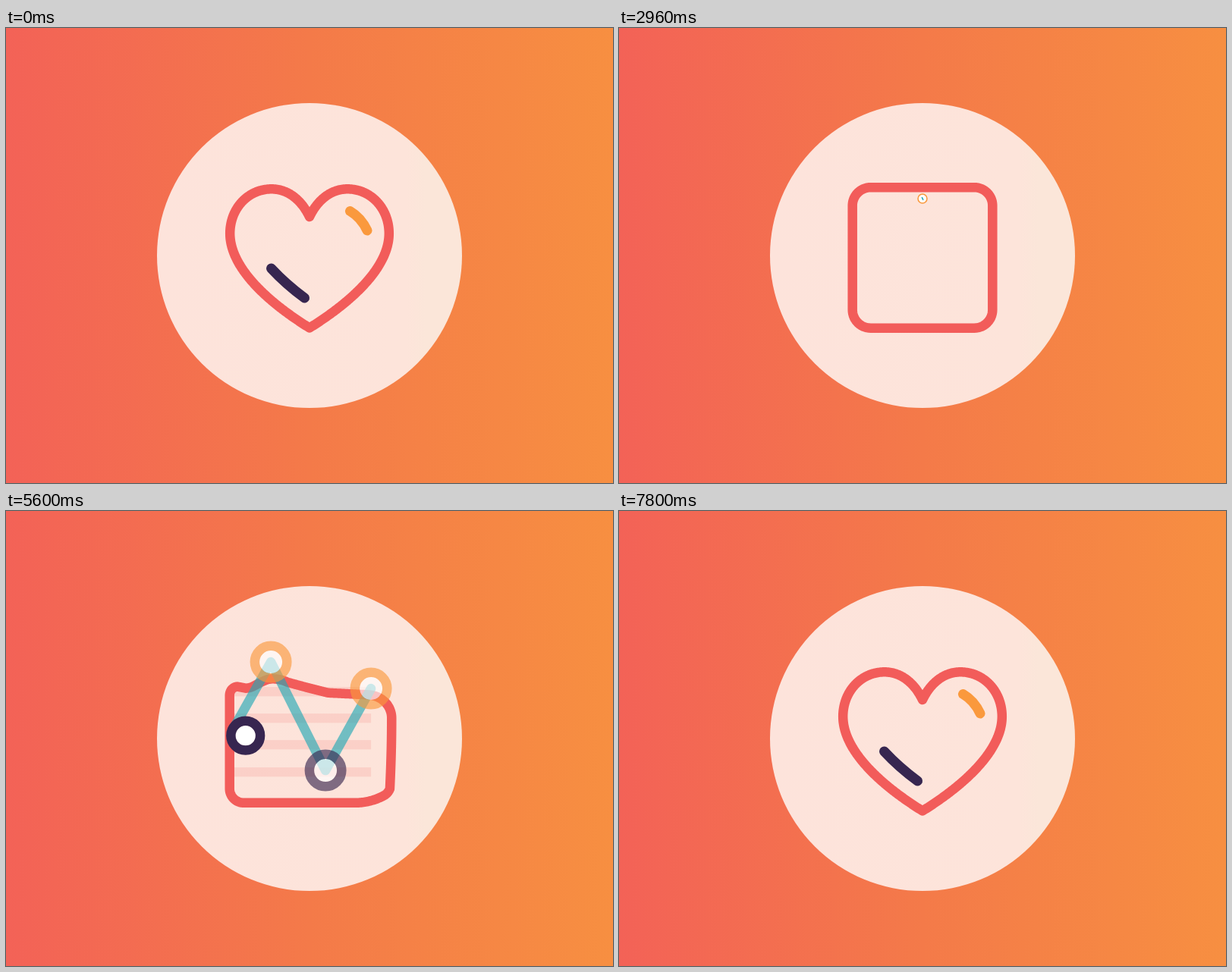
An HTML page with a canvas for the animation above (7.84 s loop, 800 by 600 pixels).

```html
<!DOCTYPE html>
<html lang="en">
<head>
<meta charset="utf-8">
<title>Health icons</title>
<style>
  html, body { margin: 0; width: 100%; height: 100%; overflow: hidden; }
  canvas { display: block; width: 800px; height: 600px; }
</style>
</head>
<body>
<canvas id="stage" width="800" height="600"></canvas>
<script>
const ctx = document.getElementById('stage').getContext('2d');
const LOOP = 7840, STEP = 40, MORPH = 440, LINE = 12.5;
const RED = '#f25c5a', ORANGE = '#fa993d', TEAL = '#22a9b5', DARK = '#372650';

const ramp = (t, from, to) => Math.min(1, Math.max(0, (t - from) / (to - from)));
const lerp = (a, b, p) => a + (b - a) * p;

function svgPath(d) {
  const el = document.createElementNS('http://www.w3.org/2000/svg', 'path');
  el.setAttribute('d', d);
  return el;
}

// Samples each piece evenly; every piece starts where the last one ended.
function sample(start, count, pieces) {
  const points = [];
  let [x, y] = start;
  for (const piece of pieces) {
    const el = svgPath(`M${x} ${y}${piece}`), length = el.getTotalLength();
    for (let i = 0; i <= count; i++) {
      ({ x, y } = el.getPointAtLength(length * i / count));
      points.push([x, y]);
    }
  }
  return points;
}

// Clockwise ring from the bottom, built from the left half (top to bottom).
const mirrored = half => [...[...half].reverse(), ...half.map(([x, y]) => [800 - x, y])];

const HEART = ['C389 226 371 212.3 350 212.3C319 212.3 295.2 238 295.2 271C295.2 311 335 355 400 395.5'];
const DROP = ['Q394 188 391 196', 'C373 228 355 255 342 282', 'C334 298 329 311 329 326', 'A71 71 0 0 0 400 397'];
const BOX = ['H331.7', 'A24 24 0 0 0 307.7 234.2', 'V326', 'V371.7A24 24 0 0 0 331.7 395.7H400'];
const BOX_RING = [
  'H331.7', 'A24 24 0 0 1 307.7 371.7', 'V234.2',
  'A24 24 0 0 1 310.9 222.2', 'A24 24 0 0 1 314.7 217.2', 'A24 24 0 0 1 321.9 212.3',
  'A24 24 0 0 1 331.7 210.2', 'H350', 'H400', 'H468.7',
  'A24 24 0 0 1 492.7 234.2', 'V371.7', 'A24 24 0 0 1 468.7 395.7'
];
const SHOE = [
  'H281', 'A9 9 0 0 1 272 356.7', 'V260',
  'C272 247 284 242 294 248', 'L318 262.5', 'Q328 268 338 261.5',
  'L366 243.5', 'C380 237 397 243 408 253', 'Q436 273 467 291.5', 'L497 299',
  'C522 304 535.5 322 535.5 341', 'Q535.5 350 529 357', 'C524 363 518 365.7 511 365.7H445'
];

const heart = mirrored(sample([400, 249], 239, HEART));
const dropEven = mirrored(sample([400, 188], 239, [DROP.join('')]));
const drop = mirrored(sample([400, 188], 60, DROP));
const box = mirrored(sample([400, 210.2], 60, BOX));
const boxRing = sample([468.7, 395.7], 36, BOX_RING);
const shoe = sample([445, 365.7], 36, SHOE);
const shoeEven = sample([445, 365.7], 479, [SHOE.join('')]);

const morphs = [
  { at: 1000, from: heart, to: dropEven },
  { at: 2440, from: drop, to: box },
  { at: 5440, from: boxRing, to: shoe },
  { at: 7280, from: shoeEven, to: heart }
];

function drawOutline(t) {
  const { at, from, to } = morphs.filter(m => m.at <= t).pop() || morphs[0];
  const p = ramp(t, at, at + MORPH);
  ctx.beginPath();
  from.forEach(([x, y], i) => ctx.lineTo(lerp(x, to[i][0], p), lerp(y, to[i][1], p)));
  ctx.closePath();
  ctx.strokeStyle = RED;
  ctx.lineWidth = LINE;
  ctx.stroke();
}

function mark(d, color, width) {
  return { path: new Path2D(d), length: svgPath(d).getTotalLength(), color, width };
}

function drawMark({ path, length, color, width }, part = 1, alpha = 1, cap = 'round') {
  if (part <= 0 || alpha <= 0) return;
  ctx.save();
  ctx.globalAlpha = alpha;
  ctx.lineCap = cap;
  ctx.strokeStyle = color;
  ctx.lineWidth = width;
  if (part < 1) ctx.setLineDash([length * part, length * 2]);
  ctx.stroke(path);
  ctx.restore();
}

function ring(x, y, r, color, alpha = 1, scale = 1) {
  if (scale <= 0 || alpha <= 0) return;
  ctx.save();
  ctx.globalAlpha = alpha;
  ctx.translate(x, y);
  ctx.scale(scale, scale);
  ctx.fillStyle = '#fff';
  ctx.beginPath();
  ctx.arc(0, 0, r - LINE, 0, 7);
  ctx.fill();
  ctx.strokeStyle = color;
  ctx.lineWidth = LINE;
  ctx.beginPath();
  ctx.arc(0, 0, r - LINE / 2, 0, 7);
  ctx.stroke();
  ctx.restore();
}

const shine = mark('M453.5 241.5Q468 250 476 267', ORANGE, 13);
const shade = mark('M349.5 317Q369 338 393.5 356', DARK, 13);
const dropArc = mark('M361.5 326A38.5 38.5 0 0 0 400 364.5', TEAL, 10);
const needle = mark('M395 214L406 236', TEAL, LINE);
const chartLine = mark('M315 293.5L362 210L434 353L494 245', TEAL, LINE);
const stripe = mark('M274 332.3H532', ORANGE, 13);
const laces = [mark('M414 261L395 279.5', TEAL, LINE), mark('M446 283L422 306', TEAL, LINE)];

function heartMarks(t) {
  const leaving = t < 4000;
  const part = leaving ? 1 : ramp(t, 7480, 7800);
  const alpha = leaving ? 1 - ramp(t, 1000, 1000 + MORPH) : 1;
  drawMark(shine, part, alpha);
  drawMark(shade, part, alpha);
}

function bars(t, fade) {
  const first = ramp(t, 3240, 3320), extra = ramp(t, 3960, 3960 + MORPH);
  [[249, extra], [284, extra], [319, first], [355, first]].forEach(([y, shown]) => {
    ctx.globalAlpha = 0.23 * shown * fade;
    ctx.fillStyle = RED;
    ctx.fillRect(308, y - 6, 186, 12.3);
  });
  ctx.globalAlpha = 1;
}

function dialAndChart(t, fade) {
  const move = ramp(t, 3960, 3960 + MORPH);
  const pop = ramp(t, 4440, 4760);
  drawMark(chartLine, ramp(t, 4405, 4985), fade);
  ring(434, 353, 27.5, DARK, fade, pop);
  ring(494, 245, 27.5, ORANGE, fade, pop);
  const grow = ramp(t, 2920, 3240);
  ring(lerp(400, 362, move), lerp(225, 210, move), lerp(54, 27.5, move), ORANGE, fade, grow);
  ctx.save();
  ctx.translate(400, 225);
  ctx.scale(grow, grow);
  ctx.translate(-400, -225);
  if (grow > 0) drawMark(needle, 1, 1 - move);
  ctx.restore();
}

function shoeMarks(t, alpha) {
  const part = ramp(t, 5900, 6280);
  drawMark(stripe, part, alpha, 'butt');
  laces.forEach(lace => drawMark(lace, part, alpha));
}

function across(...stops) {
  const g = ctx.createLinearGradient(0, 0, 800, 0);
  stops.forEach(([at, color]) => g.addColorStop(at, color));
  return g;
}
const backdrop = across([0, '#f36257'], [0.5, '#f47a49'], [1, '#f78f41']);
const disc = across([0.25, '#fde3db'], [0.66, '#fde4da'], [0.69, '#fbe6d9'], [0.75, '#fbe6d9']);

function draw(t) {
  ctx.fillStyle = backdrop;
  ctx.fillRect(0, 0, 800, 600);
  ctx.fillStyle = disc;
  ctx.beginPath();
  ctx.arc(400, 300, 201, 0, 7);
  ctx.fill();
  ctx.lineJoin = 'round';

  const toShoe = ramp(t, 5440, 5440 + MORPH);
  const shoeAlpha = 1 - ramp(t, 7280, 7280 + MORPH);
  const slide = () => ctx.translate(-35.5 * toShoe, -30 * toShoe);

  heartMarks(t);
  drawMark(dropArc, ramp(t, 1200, 1480), 1 - ramp(t, 2440, 2440 + MORPH));
  ctx.save();
  slide();
  bars(t, 1 - toShoe);
  ctx.restore();
  shoeMarks(t, shoeAlpha);

  drawOutline(t);

  ctx.save();
  slide();
  dialAndChart(t, 1 - toShoe);
  ctx.restore();
  ring(lerp(315, 317, toShoe), lerp(293.5, 301, toShoe), lerp(27.5, 22.3, toShoe),
    DARK, shoeAlpha, ramp(t, 4440, 4760));
}

let began;
function tick(now) {
  began ??= now;
  draw(Math.floor(((now - began) % LOOP) / STEP) * STEP);
  requestAnimationFrame(tick);
}
draw(0);
requestAnimationFrame(tick);
</script>
</body>
</html>
```
